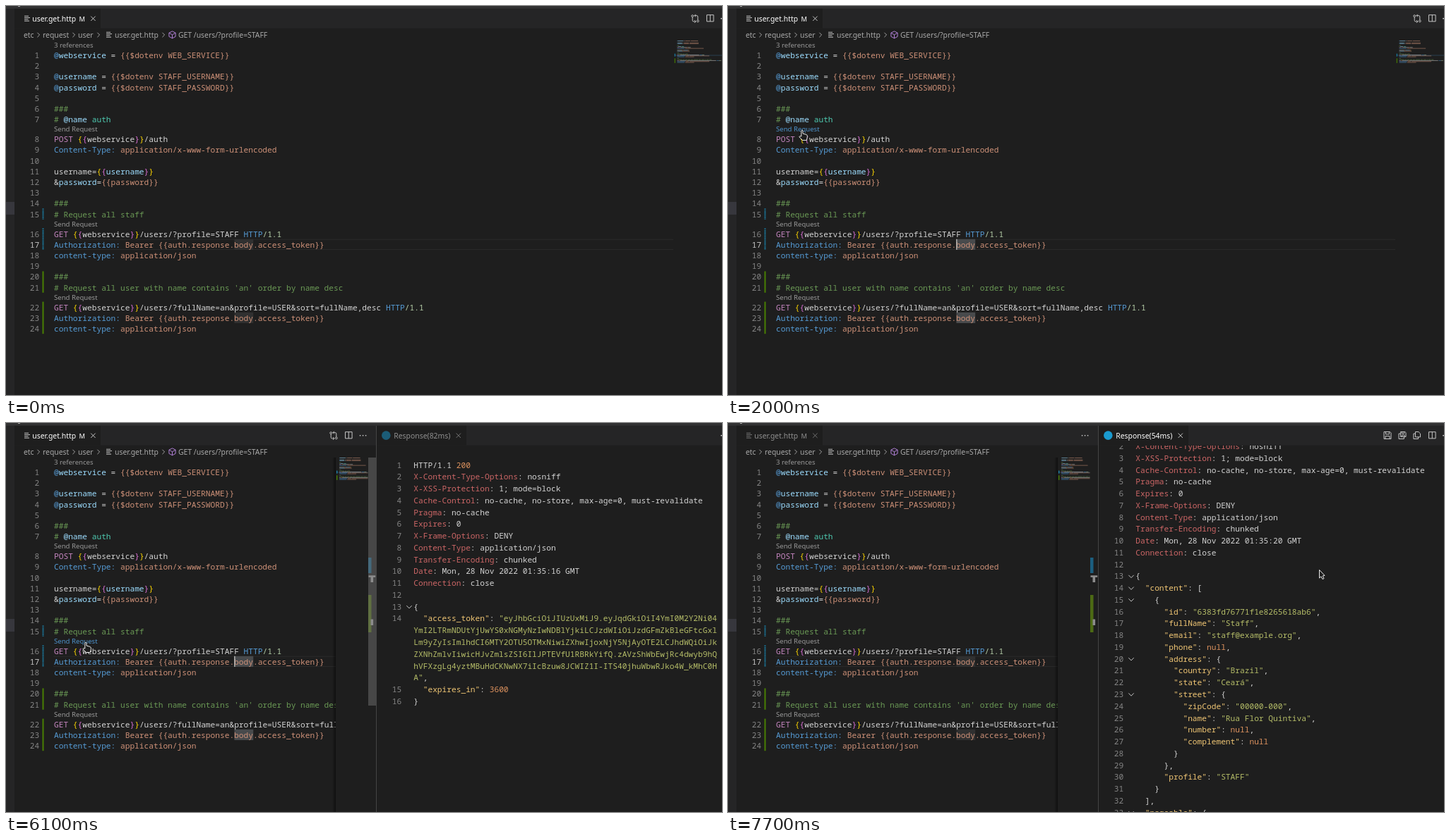
Animation of 1014 by 552 pixels, one loop 8000 ms. Source, as an HTML page:

```html
<!DOCTYPE html>
<html lang="en">
<head>
<meta charset="utf-8">
<title>HTTP request editor</title>
<style>
html, body { margin: 0; width: 100%; height: 100%; overflow: hidden; background: #1e1e1e; }
svg { display: block; }
text { white-space: pre; font: 10.4px "Noto Sans", sans-serif; fill: #a9a9a9; }
.code, .code text { font: 11.2px "Noto Sans Mono", monospace; fill: #d4d4d4; }
.code .num { fill: #858585; text-anchor: end; }
.code .lens { font: 9.6px "Noto Sans", sans-serif; fill: #999; }
.code .lens.hover { fill: #4e94ce; }
.code .current { fill: #c6c6c6; }
.tab { opacity: .5; }
.tab.active { opacity: 1; }
.tab text { fill: #fff; }
.icon { fill: none; stroke: #c5c5c5; }
.pointer { fill: #1e1e1e; stroke: #fff; stroke-width: .9; stroke-linejoin: round; }
</style>
</head>
<body>
<svg id="stage" width="1014" height="552" viewBox="0 0 1014 552"></svg>
<script>
const CHAR = 6.72, LEFT = 68, ROW = 15.2, LENS = 12.8, TOP = 62, OUT_ROW = 16.76;
const COLORS = {
  t: '#d4d4d4', k: '#569cd6', v: '#9cdcfe', s: '#ce9178', c: '#6a9955', m: '#c586c0', e: '#4ec9b0',
  d: '#b5cea8', o: '#ffd700', p: '#da70d6', r: '#cc6666', n: '#de935f', y: '#f0c674', g: '#b5bd68'
};

// "~x" switches to colour x of COLORS
const source = `~k@~vwebservice~t = ~s{{$dotenv WEB_SERVICE}}

~k@~vusername~t = ~s{{$dotenv STAFF_USERNAME}}
~k@~vpassword~t = ~s{{$dotenv STAFF_PASSWORD}}

~c###
~c# ~v@name ~eauth
~mPOST ~o{~p{~twebservice~p}~o}~t/auth
~kContent-Type: ~sapplication/x-www-form-urlencoded

~tusername=~o{~p{~vusername~p}~o}
~t&~vpassword~t=~s{{password}}

~c###
~c# Request all staff
~mGET ~o{~p{~twebservice~p}~o}~t/users/?profile=STAFF ~kHTTP~d/1.1
~kAuthorization: ~sBearer {{auth.response.body.access_token}}
~kcontent-type: ~sapplication/json

~c###
~c# Request all user with name contains 'an' order by name desc
~mGET ~o{~p{~twebservice~p}~o}~t/users/?fullName=an&profile=USER&sort=fullName,desc ~kHTTP~d/1.1
~kAuthorization: ~sBearer {{auth.response.body.access_token}}
~kcontent-type: ~sapplication/json`.split('\n');

const headers = seconds => `~tHTTP/1.1 ~n200
X-Content-Type-Options: nosniff
X-XSS-Protection: 1; mode=block
Cache-Control: no-cache, no-store, max-age=0, must-revalidate
Pragma: no-cache
Expires: 0
X-Frame-Options: DENY
Content-Type: application/json
Transfer-Encoding: chunked
Date: Mon, 28 Nov 2022 01:35:${seconds} GMT
Connection: close
`.replace(/^([\w-]+):/gm, '~r$1~t:').split('\n');

const json = text => text
  .replace(/"[^"\n]*"(:?)/g, (m, colon) => colon ? '~y' + m.slice(0, -1) + '~t:' : '~g' + m + '~t')
  .replace(/null|3600/g, '~n$&~t').split('\n');

// a leading "^" marks a wrapped line without its own number
const tokenReply = [...headers(16), '{',
  '  ~y"access_token"~t: ~g"eyJhbGciOiJIUzUxMiJ9.eyJqdGkiOiI4YmI0M2Y2Ni04',
  '^~gYmI2LTRmNDUtYjUwYS0xNGMyNzIwNDBlYjkiLCJzdWIiOiJzdGFmZkBleGFtcGxl',
  '^~gLm9yZyIsImlhdCI6MTY2OTU5OTMxNiwiZXhwIjoxNjY5NjAyOTE2LCJhdWQiOiJk',
  '^~gZXNhZmlvIiwicHJvZmlsZSI6IlJPTEVfU1RBRkYifQ.zAVzShWbEwjRc4dwyb9hQ',
  '^~ghVFXzgLg4yztMBuHdCKNwNX7iIcBzuw8JCWIZ1I-ITS40jhuWbwRJko4W_kMhC0H',
  '^~gA"~t,', ...json('  "expires_in": 3600\n}')];

const usersReply = [...headers(20), ...json(`{
  "content": [
    {
      "id": "6383fd76771f1e8265618ab6",
      "fullName": "Staff",
      "email": "staff@example.org",
      "phone": null,
      "address": {
        "country": "Brazil",
        "state": "Ceará",
        "street": {
          "zipCode": "00000-000",
          "name": "Rua Flor Quintiva",
          "number": null,
          "complement": null
        }
      },
      "profile": "STAFF"
    }
  ],
  "pageable": {`)];

const rect = (x, y, w, h, fill, more = '') => `<rect x="${x}" y="${y}" width="${w}" height="${h}" fill="${fill}" ${more}/>`;
const path = (d, more = '') => `<path d="${d}" ${more}/>`;
const label = (x, y, text, more = '') => `<text x="${x}" y="${y}" ${more}>${text.replace(/&/g, '&amp;')}</text>`;
const group = (id, content, more = '') => `<g id="${id}" ${more}>${content}</g>`;
const icon = (x, y, d, more = '') => path(d, `class="icon" transform="translate(${x} ${y})" ${more}`);

const tokens = line => line.split('~').filter(Boolean)
  .map(part => COLORS[part[0]] && line.includes('~' + part) ? [COLORS[part[0]], part.slice(1)] : [COLORS.t, part]);
const colored = (x, y, line) => `<text x="${x}" y="${y}">` + tokens(line)
  .map(([color, text]) => `<tspan style="fill:${color}">${text.replace(/&/g, '&amp;')}</tspan>`).join('') + '</text>';

const lensBefore = [8, 16, 22];
const lineTop = n => TOP + (n - 1) * ROW + lensBefore.filter(l => l <= n).length * LENS;

function editorCode() {
  let numbers = '', lines = label(LEFT, TOP - 2.8, '3 references', 'class="lens"');
  source.forEach((line, i) => {
    const n = i + 1, y = lineTop(n);
    numbers += label(47.3, y + 12, String(n), `class="num ${n === 17 ? 'current' : ''}"`);
    if (lensBefore.includes(n)) lines += label(LEFT, y - 2.8, 'Send Request', `class="lens" id="lens${n}"`);
    if (line) lines += colored(LEFT, y + 12, line);
  });
  return [numbers, lines];
}

function minimap() {
  let out = rect(-4, 20.6, 68, .8, '#2d4a5c') + rect(-4, 18.6, 1.4, 4, '#1b81a8') + rect(-4, 25.3, 1.4, 6.6, '#487e02');
  source.forEach((line, row) => {
    let x = 0;
    for (const [color, text] of tokens(line)) {
      for (const word of text.matchAll(/\S+/g))
        out += rect(x + word.index * .8, row * 1.33, word[0].length * .8, 1, color, 'opacity=".5"');
      x += text.length * .8;
    }
  });
  return out;
}

function reply(lines) {
  let n = 0;
  return lines.map((line, i) => {
    const y = 63.6 + i * OUT_ROW, wrapped = line[0] === '^';
    let out = colored(577.3, y, wrapped ? line.slice(1) : line);
    if (!wrapped) out += label(560.3, y, String(++n), 'class="num"');
    if (/[{[]$/.test(line)) out += icon(571, y - 3.6, 'M-3.7-2 0 1.8 3.7-2');
    return out;
  }).join('');
}

const CLOSE = 'M-3.2-3.2 3.2 3.2M3.2-3.2-3.2 3.2', CHEVRON = 'M-1.6-3.2 1.6 0-1.6 3.2';
const LIST = 'M-4-3.3H2M-4-1H4M-4 1.3H1.5M-4 3.6H3';
const COMPARE = 'M-3.8-2V2.6Q-3.8 4.2-2.2 4.2H1M-.8 2.4 1 4.2-.8 6M3.8 2V-2.6Q3.8-4.2 2.2-4.2H-1M.8-2.4-1-4.2 .8-6' +
  'M-5.2-3.6a1.4 1.4 0 1 0 2.8 0a1.4 1.4 0 1 0-2.8 0M2.4 3.6a1.4 1.4 0 1 0 2.8 0a1.4 1.4 0 1 0-2.8 0';
const SPLIT = 'M-4.8-4.6H4.8V4.6H-4.8ZM0-4.6V4.6';
const SAVE = 'M-5-5H3.4L5-3.4V5H-5ZM-2.6-5V-1.6H2.4V-5M-3 5V1.2H3V5';
const SAVE_ALL = 'M-2.4-5H3.8L5-3.8V2H-2.4ZM-.6-5V-2.6H2.6V-5M-.6 2V-.4H3V2M-2.4-2.4H-5V5H2.4V2';
const COPY = 'M-2-5H2.4L5-2.4V2.4H-2ZM-2-2.4H-4.6V5H2V2.4';
const CUBE = 'M0-5 4.6-2.6V2.6L0 5-4.6 2.6V-2.6ZM-4.6-2.6 0 0 4.6-2.6M0 0V5';
const dots = [501.5, 505.5, 509.5].map(x => rect(x - .7, 17, 1.5, 1.5, '#c5c5c5')).join('');

const [numbers, lines] = editorCode();
const bodyX = LEFT + 38 * CHAR;
const bodyMarks = [17, 23].map(n => rect(bodyX, lineTop(n), 4 * CHAR, ROW, 'currentColor')).join('');
const hatch = (from, to) => path(`M52.5 ${lineTop(from)}V${lineTop(to) + ROW}`, 'stroke="#1b81a8" stroke-width="2" stroke-dasharray="1.5 .8"');
const added = (from, to) => rect(51.5, lineTop(from), 2, lineTop(to) + ROW - lineTop(from), '#487e02');

document.getElementById('stage').innerHTML = `
<defs>
  <clipPath id="codeArea"><rect id="codeClip" x="12" y="49" width="933" height="503"/></clipPath>
  <clipPath id="mapArea"><rect x="-4" y="-2" width="68" height="40"/></clipPath>
  <clipPath id="replyArea"><rect x="525" y="32" width="489" height="520"/></clipPath>
  <linearGradient id="shade"><stop offset="0" stop-opacity="0"/><stop offset="1" stop-opacity=".5"/></linearGradient>
</defs>` +
  rect(0, 0, 1014, 552, '#1e1e1e') + rect(0, 0, 12, 552, '#252526') + rect(0, 278, 12, 18, '#37373d') +
  rect(12, 3.6, 1002, 28, '#252526') + rect(0, 0, 1014, 3.8, '#323233') + rect(17, 0, 3, 1, '#aaa') +
  rect(12, 3.8, 122, 28, '#1e1e1e') +
  group('fileTab', icon(30, 17.6, LIST) + label(37.3, 21.7, 'user.get.http') +
    label(103.5, 21.5, 'M', 'style="font-size:9.4px"') + icon(123.4, 17.8, CLOSE), 'class="tab"') +
  [[25, 'etc'], [52, 'request'], [102, 'user'], [154, 'user.get.http'], [244, 'GET /users/?profile=STAFF']]
    .map(([x, text]) => label(x, 44.7, text)).join('') +
  [46, 96, 131, 223].map(x => icon(x, 41, CHEVRON, 'opacity=".8"')).join('') +
  icon(146, 40.6, LIST) + icon(235.5, 40.8, CUBE, 'style="stroke:#b180d7"') +
  group('editor',
    path(`M67 ${lineTop(17) + .5}H945M67 ${lineTop(17) + ROW - .5}H945`, 'stroke="#2a2a2a"') +
    group('bodyMarks', bodyMarks) + numbers + hatch(15, 15) + hatch(16, 17) + added(20, 21) + added(22, 24) + lines,
    'class="code" clip-path="url(#codeArea)"') +
  group('caret', rect(bodyX - .3, lineTop(17), 1.5, ROW, '#aeafad')) +
  group('splitView',
    rect(462, 49, 5, 503, 'url(#shade)') +
    rect(513, 191, 4.5, 22, '#1b5f80') + rect(513, 244, 4.5, 53, '#4c6a14') +
    group('slider', rect(513, 49, 11, 352, '#797979')) +
    rect(513.5, 216.3, 9.7, 2.6, '#8c8c8c') + rect(516.5, 218, 3.6, 8, '#8c8c8c') + rect(516.5, 278.5, 3.6, 8.5, '#8c8c8c') +
    rect(524, 3.8, 1, 549, '#444') + rect(525, 3.8, 127, 28, '#1e1e1e') +
    group('replyTab', '<circle cx="538.3" cy="17.6" r="6.3" fill="#1a9bd0"/>' +
      label(549.3, 21.7, '', 'id="replyTitle"') + icon(640.8, 17.8, CLOSE), 'class="tab"') + dots) +
  group('map', `<g clip-path="url(#mapArea)">${minimap()}</g>`) +
  group('fileTools', icon(0, 17.8, COMPARE) + icon(21.3, 17.3, SPLIT)) +
  group('replyTools', icon(934, 17.5, SAVE) + icon(955, 17.5, SAVE_ALL) + icon(975.5, 17.5, COPY) + icon(997.3, 17.3, SPLIT)) +
  rect(1012.2, 17, 1.8, 1.5, '#c5c5c5') +
  group('replies', group('tokenReply', reply(tokenReply)) + group('usersReply', reply(usersReply)),
    'class="code" clip-path="url(#replyArea)"') +
  group('arrow', path('M.5 .5V12L3 9.8 5 13.6 7 12.6 5.2 9 8 8.4Z', 'class="pointer"')) +
  group('hand', path('M3.8 2.2Q4.9 .2 6 2.2V6L10.8 7.4Q12.8 8 12.4 10.4L11.4 15.5H5.6L.8 10.8Q1 9 3.8 10Z', 'class="pointer"')) +
  group('ibeam', path('M-2.2-7.5H2.2M0-7.5V7.5M-2.2 7.5H2.2', 'stroke="#ddd" fill="none"'));

const el = id => document.getElementById(id);
const show = (id, on) => { el(id).style.display = on ? '' : 'none'; };

function pointerAt(t) {
  if (t < 400) return ['none', 0, 0];
  if (t < 1200) {
    const p = (Math.floor(t / 100) * 100 - 400) / 800, k = p * p * (3 - 2 * p);
    const x = 326 - 221 * k, y = 66 + 112 * k;
    return y > 169 ? ['hand', x - 5, y - 2] : ['ibeam', x, y];
  }
  if (t < 1300) return ['hand', 100, 176];
  if (t < 5100) return ['hand', 100, 175];
  if (t < 5400) return ['arrow', 21, 315];
  if (t < 5700) return ['ibeam', 90, 321];
  if (t < 6900) return ['hand', 108, 310];
  if (t < 7200) return ['ibeam', 398.5, 244];
  return ['arrow', 837, 208];
}

function draw(t) {
  const split = t >= 2300;
  const refocused = t >= 6100 && t < 6400;
  const focused = refocused || (t >= 1800 && !split);
  const fileActive = !split || refocused;

  show('splitView', split);
  el('codeClip').setAttribute('width', split ? 455 : 933);
  el('map').setAttribute('transform', `translate(${split ? 472 : 950.5} 49)`);
  el('mapArea').firstChild.setAttribute('width', split ? 44.5 : 68);
  el('slider').setAttribute('opacity', t < 7400 ? .45 : t < 7700 ? .36 : 0);

  el('fileTab').classList.toggle('active', fileActive);
  el('replyTab').classList.toggle('active', !fileActive);
  show('fileTools', fileActive);
  el('fileTools').setAttribute('transform', `translate(${split ? 464 : 976} 0)`);
  show('replyTools', !fileActive);
  el('replyTitle').textContent = t < 6400 ? 'Response(82ms)' : 'Response(54ms)';

  show('caret', focused);
  el('bodyMarks').style.color = focused ? '#484a4c' : '#303030';
  const [kind, x, y] = pointerAt(t);
  el('lens8').classList.toggle('hover', t < 5100 && kind === 'hand');
  el('lens16').classList.toggle('hover', t >= 5700 && t < 6900);

  show('tokenReply', t >= 5100 && t < 6400);
  show('usersReply', t >= 6400);
  el('usersReply').setAttribute('transform', `translate(0 ${t < 7700 ? 0 : -43.3})`);

  for (const id of ['arrow', 'hand', 'ibeam']) show(id, id === kind);
  if (kind !== 'none') el(kind).setAttribute('transform', `translate(${x} ${y})`);
}

const start = performance.now();
function tick() {
  draw((performance.now() - start) % 8000);
  requestAnimationFrame(tick);
}
tick();
</script>
</body>
</html>
```
